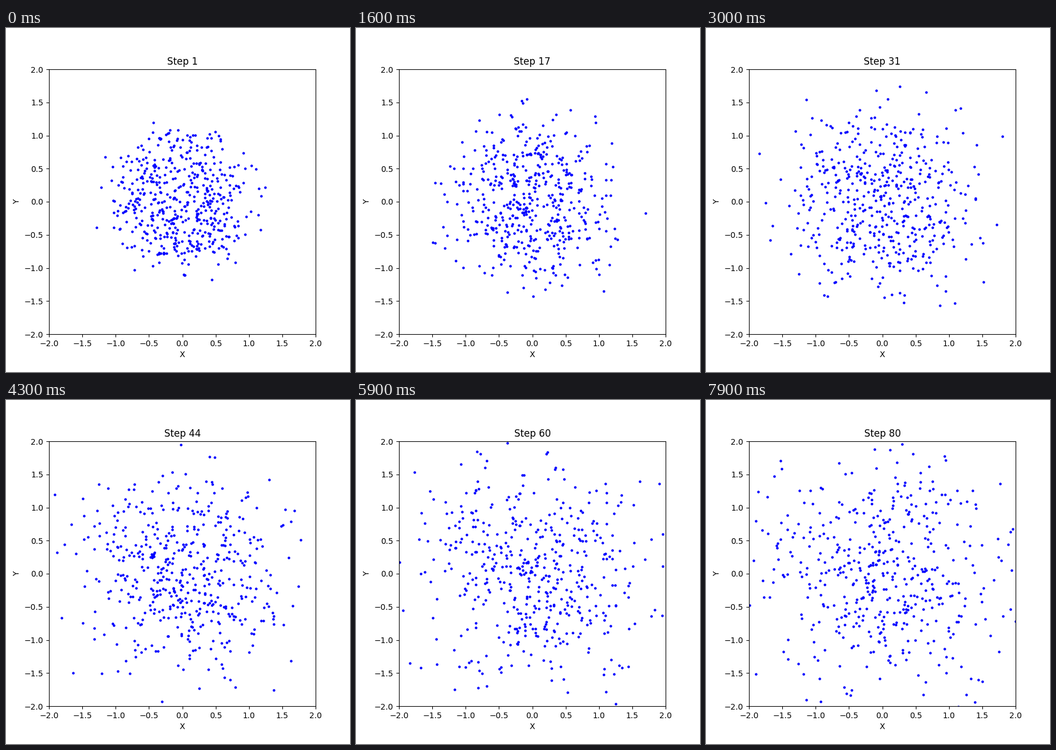
Recreate the animation shown at these times as a matplotlib script. Size 600x600 px, loop 8 s.

```python
import numpy as np
import matplotlib.pyplot as plt
from matplotlib.animation import FuncAnimation

COUNT, STEPS = 500, 80
RADIUS, BLUR, STEP = 0.95, 0.17, 0.08


def random_walk(rng):
    """Positions of every walker at every step: (STEPS, COUNT, 2)."""
    angle = rng.uniform(0, 2 * np.pi, COUNT)
    r = RADIUS * np.sqrt(rng.uniform(0, 1, COUNT))
    disc = np.column_stack([r * np.cos(angle), r * np.sin(angle)])
    moves = rng.normal(0, STEP, (STEPS, COUNT, 2))
    moves[0] = disc + rng.normal(0, BLUR, (COUNT, 2))
    return moves.cumsum(axis=0)


path = random_walk(np.random.default_rng(3))

fig, ax = plt.subplots(figsize=(6, 6), dpi=100)
ax.set(xlim=(-2, 2), ylim=(-2, 2), xlabel="X", ylabel="Y")
dots = ax.scatter(*path[0].T, s=5, color="blue")
title = ax.set_title("Step 1")


def update(i):
    dots.set_offsets(path[i])
    title.set_text(f"Step {i + 1}")
    return dots, title


anim = FuncAnimation(fig, update, frames=STEPS, interval=100,
                     repeat=True, repeat_delay=0, blit=False)
plt.show()
```
